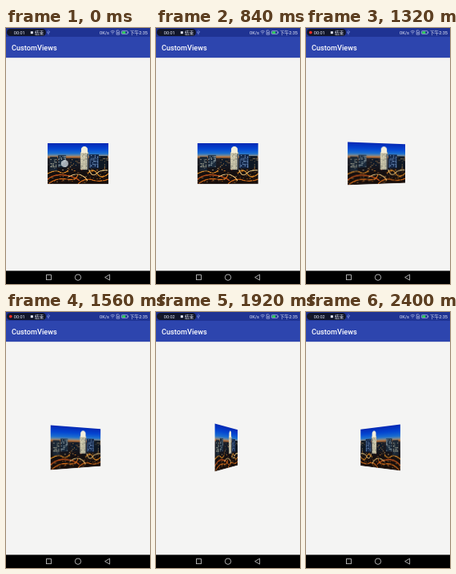
Recreate the animation shown at these times as an HTML page with a canvas. Size 180 px wide and 320 px high, loop 2.52 s.

```html
<!DOCTYPE html>
<html lang="en">
<head>
<meta charset="utf-8">
<title>CustomViews</title>
<style>
html, body { margin: 0; width: 100%; height: 100%; overflow: hidden; background: #f4f4f3; }
svg, #photo, #touch { position: absolute; }
svg { left: 0; top: 0; }
text { font-family: Roboto, "Noto Sans CJK SC", "Noto Sans CJK", sans-serif; font-size: 5.6px; fill: #e6eaf8; }
#title { font-size: 9.2px; font-weight: 500; fill: #fff; }
#photo { left: 52px; top: 144.4px; width: 76px; height: 51px; }
#touch { left: 68.5px; top: 165px; width: 9px; height: 9px; border-radius: 50%; background: #dce2e8b8; }
</style>
</head>
<body>
<svg width="180" height="320" viewBox="0 0 180 320">
  <rect width="180" height="320" fill="#f4f4f3"/>
  <rect y="37" width="180" height="1" fill="#d3d6e2"/>
  <rect width="180" height="37" fill="#2d45ae"/>
  <rect width="180" height="11" fill="#1f3393"/>
  <text id="title" x="7" y="27.8">CustomViews</text>

  <rect x="1" y="1" width="49" height="9" rx="4.5" fill="#11162b"/>
  <circle id="rec" cx="5.8" cy="5.6" r="1.9"/>
  <text id="clock" x="9.8" y="7.7">00:01</text>
  <rect x="30.8" y="4.2" width="3" height="3" fill="#e6eaf8"/>
  <text x="36" y="7.7">结束</text>
  <path d="M53 2.5v6M51.5 4.5v1.3l1.5 1M54.5 4v1.3l-1.5 1" fill="none" stroke="#8fa5ec" stroke-width=".6"/>

  <text x="117" y="7.8">0K/s</text>
  <g fill="none" stroke="#cdd5f2" stroke-width=".6">
    <path d="M130.6 4.4q2.7-2.2 5.4 0M131.6 5.8q1.7-1.3 3.4 0M132.6 7.2q.7-.5 1.4 0"/>
    <path d="M138.2 3h2.4l1.2 1.2v4h-3.6zM139.2 5.2l1.6 1.8m0-1.8l-1.6 1.8"/>
    <rect x="144.6" y="3.6" width="7.4" height="4" rx=".6"/>
  </g>
  <path d="M145.3 4.3h4v2.6h-4z" fill="#31dc56"/>
  <path d="M152.3 4.8h.8v1.6h-.8z" fill="#cdd5f2"/>
  <text x="155" y="7.8">下午2:35</text>

  <rect y="303.5" width="180" height="16.5"/>
  <g fill="none" stroke="#d5d5d5" stroke-width=".8">
    <rect x="50.4" y="308.7" width="6" height="6"/>
    <circle cx="90" cy="311.7" r="3.7"/>
    <path d="M129.6 308.2v7l-6-3.5z"/>
  </g>
</svg>
<canvas id="photo" width="456" height="306"></canvas>
<div id="touch"></div>
<script>
const el = id => document.getElementById(id);
const photo = el('photo'), touch = el('touch'), rec = el('rec'), clock = el('clock');
const c = photo.getContext('2d');
let seed = 7;
const rand = () => (seed = seed * 16807 % 2147483647) / 2147483647;

function box(x, y, w, h, color) {
  c.fillStyle = color;
  c.fillRect(x, y, w, h);
}

function building(x, y, w, h, wall, light, density) {
  box(x, y, w, h, wall);
  for (let j = y + 1; j < y + h - 1; j += 1.8)
    for (let i = x + .6; i < x + w - .8; i += 1.6)
      if (rand() < density) box(i, j, 1, 1, light);
}

function road(color, width, path) {
  c.strokeStyle = color;
  c.lineWidth = width;
  c.stroke(new Path2D(path));
}

function drawCity() {
  c.scale(6, 6);
  const sky = c.createLinearGradient(0, 0, 0, 51);
  [[0, '#0428b4'], [.14, '#0446d2'], [.25, '#1b6fd0'], [.3, '#6f8a9c'], [.34, '#c8793a'],
   [.38, '#23232c'], [.6, '#14151c'], [1, '#1c0f0a']].forEach(s => sky.addColorStop(...s));
  box(0, 0, 76, 51, sky);

  // Scattered city lights
  for (let i = 0; i < 190; i++) {
    const color = ['#f08a20', '#a8481a', '#d8b078', '#08090e'][i % 4];
    box(rand() * 75, 19 + rand() * 31, .7 + rand(), .8, color);
  }
  building(3, 17, 9, 18, '#1a2634', '#d8d4b4', .45);
  building(13, 15, 10, 15, '#1a2a3c', '#b4c4c4', .55);
  building(28, 19, 10, 10, '#101a28', '#c88a40', .3);
  building(64, 16, 11, 15, '#0e1824', '#a58a60', .25);
  building(52, 14, 12, 17, '#14284a', '#8fb4e4', .45);
  box(0, 35, 76, 16, '#120a0866');
  road('#c8561a', 1.3, 'M0 45Q9 38 22 40T40 47');
  road('#ffa02a', 1, 'M0 38Q10 33 15 36T26 34M50 38Q57 30 62 38T76 38');
  road('#f07a1c', 1, 'M2 50Q12 43 24 45T38 39M38 51Q46 43 56 46T76 45');
  road('#ffd888', .9, 'M52 34Q56 43 61 38T75 34M26 42Q36 37 42 40T50 47');

  // Tapered main tower with a lit crown
  building(41, 11, 10, 22, '#a8a690', '#fff6d4', .8);
  c.fillStyle = '#f4efdc';
  c.fill(new Path2D('M42 12V7Q43 4 46 4T50 7V12z'));
  box(49.4, 13, 1.6, 20, '#5c6266');
}

function show(time) {
  const t = Math.floor(time % 2520 / 120) * 120;
  const angle = (Math.max(0, t - 651) * .00652) ** 2;
  photo.style.transform = `perspective(235px) rotateY(${angle}deg)`;
  touch.style.opacity = t < 600 ? 1 : 0;
  rec.setAttribute('fill', t >= 960 && t < 1800 ? '#f32d25' : '#1c1a26');
  clock.textContent = t < 1800 ? '00:01' : '00:02';
}

drawCity();
const start = performance.now();
function tick() {
  show(performance.now() - start);
  requestAnimationFrame(tick);
}
tick();
</script>
</body>
</html>
```
